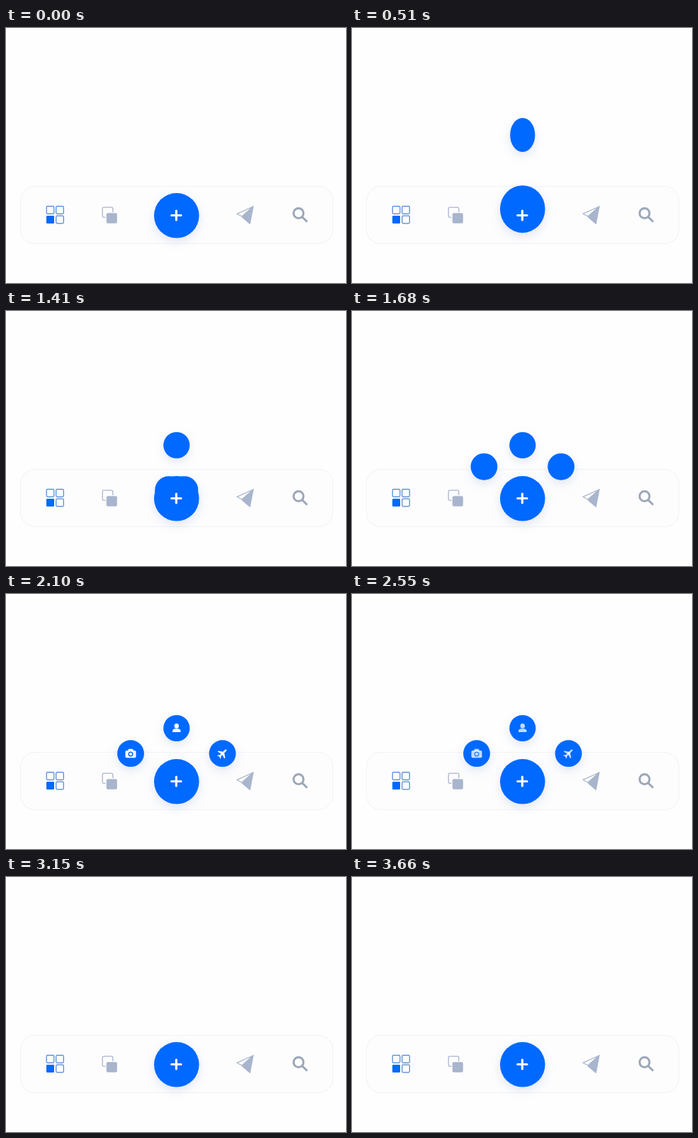
An HTML page with a canvas for the animation above (3.72 s loop, 480 by 360 pixels).

```html
<!DOCTYPE html>
<html lang="en">
<head>
<meta charset="utf-8">
<title>Gooey tab bar</title>
<style>
html, body { margin: 0; width: 480px; height: 360px; overflow: hidden; background: #fefefe; }
canvas { display: block; }
</style>
</head>
<body>
<canvas id="stage" width="480" height="360"></canvas>
<script>
const LOOP = 3720;
const BLUE = '#0069ff', GREY = '#a8b5cc', WHITE = '#fff', PAGE = '#fefefe';
const HOME = { x: 240.8, y: 264.8, r: 31.8 };
const ctx = document.getElementById('stage').getContext('2d');
const gooCanvas = document.createElement('canvas');
gooCanvas.width = 480;
gooCanvas.height = 360;
const goo = gooCanvas.getContext('2d');

// Smooth monotone curve through [time, value] keys.
function track(...keys) {
  const n = keys.length;
  const rate = i => (keys[i + 1][1] - keys[i][1]) / (keys[i + 1][0] - keys[i][0]);
  const slopes = keys.map((_, i) => {
    if (i === 0 || i === n - 1) return 0;
    const a = rate(i - 1), b = rate(i);
    return a * b > 0 ? 2 * a * b / (a + b) : 0;
  });
  return t => {
    if (t <= keys[0][0]) return keys[0][1];
    if (t >= keys[n - 1][0]) return keys[n - 1][1];
    let i = 0;
    while (t >= keys[i + 1][0]) i++;
    const [t0, v0] = keys[i], [t1, v1] = keys[i + 1];
    const w = t1 - t0, u = (t - t0) / w, u2 = u * u, u3 = u2 * u;
    return v0 * (2 * u3 - 3 * u2 + 1) + v1 * (3 * u2 - 2 * u3)
      + w * (slopes[i] * (u3 - 2 * u2 + u) + slopes[i + 1] * (u3 - u2));
  };
}

const motion = {
  topY: track([60, 0], [240, -35], [390, -92], [510, -113.8], [550, -113], [720, -101],
    [990, -84.3], [1080, -81.2], [1400, -75.3]),
  stretch: track([180, 0], [400, 1], [510, 1], [740, 0]),
  lift: track([120, 0], [390, -12], [510, -9.2], [780, 0]),
  sideX: track([1290, 0], [1500, 26], [1590, 43], [1680, 54.3], [1950, 64.8]),
  sideY: track([1290, 0], [1500, -27], [1590, -40], [1680, -45], [1950, -39.6]),
  reach: track([2670, 1], [2850, 0.65], [3030, 0.15], [3130, 0]),
  icons: track([1830, 0], [2040, 1], [2500, 1], [2660, 0])
};

function ellipse(c, x, y, rx, ry = rx) {
  c.beginPath();
  c.ellipse(x, y, rx, ry, 0, 0, Math.PI * 2);
  c.fill();
}

function box(x, y, w, h, r, fill, stroke, line = 1) {
  ctx.beginPath();
  ctx.roundRect(x, y, w, h, r);
  if (fill) { ctx.fillStyle = fill; ctx.fill(); }
  if (stroke) { ctx.strokeStyle = stroke; ctx.lineWidth = line; ctx.stroke(); }
}

function trace(points, closed) {
  ctx.beginPath();
  points.forEach(([x, y]) => ctx.lineTo(x, y));
  if (closed) ctx.closePath();
}

// Joins two discs with concave arcs of radius f while they are close enough.
function neck(p, q, f) {
  const d = Math.hypot(q.x - p.x, q.y - p.y);
  if (d <= Math.abs(q.r - p.r)) return;
  const A = p.r + f, B = q.r + f;
  const a = (d * d + A * A - B * B) / (2 * d);
  const h2 = A * A - a * a;
  if (h2 <= f * f) return;
  const h = Math.sqrt(h2);
  goo.save();
  goo.translate(p.x, p.y);
  goo.rotate(Math.atan2(q.y - p.y, q.x - p.x));
  goo.beginPath();
  goo.arc(a, h, f, Math.atan2(-h, -a), Math.atan2(-h, d - a));
  goo.arc(a, -h, f, Math.atan2(h, d - a), Math.atan2(h, -a));
  goo.fill();
  goo.restore();
}

function drawTabs() {
  box(20.5, 223.5, 441, 81, 20, '#fdfdfe', '#f1f2f4');

  const outline = '#4a84d4';
  for (const [x, y] of [[57.2, 251.7], [70.7, 251.7], [70.7, 265.2]]) {
    box(x, y, 10.6, 10.6, 1.5, null, outline, 1.2);
  }
  box(57, 265, 11, 11, 1.2, BLUE);

  box(136.2, 253.2, 14.6, 14.2, 1.8, null, GREY, 1.3);
  box(140.5, 260, 17, 17, 2.5, '#fdfdfe');
  box(141.8, 261.2, 15, 14.6, 2, GREY);

  ctx.lineJoin = ctx.lineCap = 'round';
  ctx.fillStyle = ctx.strokeStyle = GREY;
  ctx.lineWidth = 1.3;
  trace([[349, 252], [326, 262.3], [333, 266]], true);
  ctx.stroke();
  trace([[349, 252], [344.3, 276.3], [333.5, 267]], true);
  ctx.fill();
  ctx.stroke();

  ctx.strokeStyle = '#9ca7b8';
  ctx.lineWidth = 3;
  ctx.beginPath();
  ctx.arc(413, 261.5, 7, 0, Math.PI * 2);
  ctx.stroke();
  trace([[418.7, 267.2], [424.3, 272.8]]);
  ctx.stroke();
}

function drawPerson(x, y) {
  ellipse(ctx, x, y - 3.2, 3.2, 3.5);
  box(x - 5.8, y + 0.8, 11.6, 4.8, [4, 4, 1, 1], WHITE);
}

function drawCamera(x, y) {
  box(x - 7.5, y - 4.3, 15, 10.3, 1.8, WHITE);
  box(x - 3.5, y - 6.5, 7, 4, 1.2, WHITE);
  ctx.fillStyle = BLUE;
  ellipse(ctx, x, y + 0.8, 3.5);
  ctx.fillStyle = WHITE;
  ellipse(ctx, x, y + 0.8, 2.1);
}

function drawPlane(x, y) {
  ctx.save();
  ctx.translate(x, y);
  ctx.rotate(Math.PI / 4);
  box(-1.3, -7.8, 2.6, 14, 1.3, WHITE);
  for (const side of [-1, 1]) {
    trace([[0, -3.2], [side * 6.8, 1.4], [side * 6.8, 3], [0, 1.2]], true);
    ctx.fill();
    trace([[0, 3.6], [side * 3, 6], [side * 3, 7.2], [0, 6.2]], true);
    ctx.fill();
  }
  ctx.restore();
}

function drawGoo(main, top, sides, t, stretch) {
  goo.clearRect(0, 0, 480, 360);
  goo.fillStyle = BLUE;
  ellipse(goo, main.x, main.y, main.r, main.r + 1.7 * stretch);
  ellipse(goo, top.x, top.y, top.r - stretch, top.r + 5.5 * stretch);
  neck(top, main, t < 1000 ? 22 : 11);
  for (const side of sides) {
    ellipse(goo, side.x, side.y, side.r);
    neck(side, main, 11);
  }
  ctx.save();
  ctx.shadowColor = 'rgba(30, 70, 150, 0.13)';
  ctx.shadowBlur = 14;
  ctx.shadowOffsetY = 5;
  ctx.drawImage(gooCanvas, 0, 0);
  ctx.restore();
}

function draw(t) {
  const reach = motion.reach(t), stretch = motion.stretch(t);
  const main = { x: HOME.x, y: HOME.y + motion.lift(t), r: HOME.r };
  const top = { x: HOME.x, y: HOME.y + motion.topY(t) * reach, r: 18.6 };
  const sides = [-1, 1].map(s => ({
    x: HOME.x + s * motion.sideX(t) * reach,
    y: HOME.y + motion.sideY(t) * reach,
    r: 18.9
  }));

  ctx.fillStyle = PAGE;
  ctx.fillRect(0, 0, 480, 360);
  drawTabs();
  drawGoo(main, top, sides, t, stretch);

  ctx.strokeStyle = WHITE;
  ctx.lineWidth = 3.2;
  trace([[233.8, 264.5], [247, 264.5]]);
  ctx.stroke();
  trace([[240.4, 258], [240.4, 271]]);
  ctx.stroke();

  ctx.globalAlpha = motion.icons(t);
  ctx.fillStyle = WHITE;
  drawPerson(top.x, top.y);
  drawCamera(sides[0].x, sides[0].y);
  drawPlane(sides[1].x, sides[1].y);
  ctx.globalAlpha = 1;
}

const start = performance.now();
function tick() {
  draw((performance.now() - start) % LOOP);
  requestAnimationFrame(tick);
}
tick();
</script>
</body>
</html>
```
